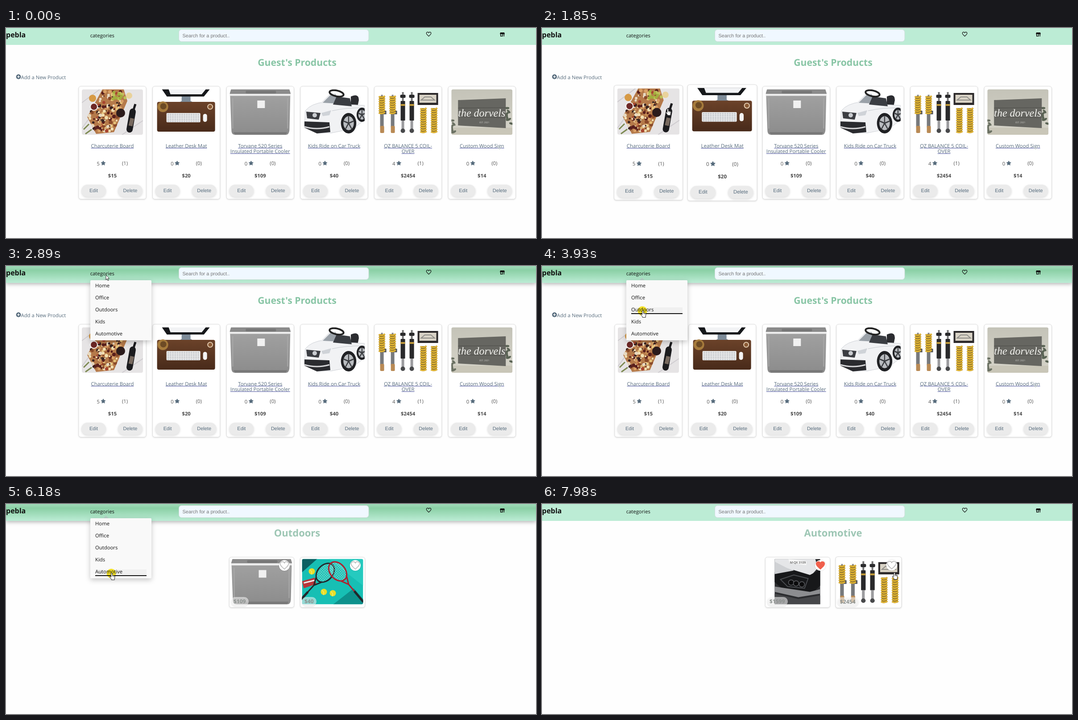
An HTML page for the animation above (8000 ms loop, 1188 by 472 pixels).

```html
<!DOCTYPE html>
<html lang="en">
<head>
<meta charset="utf-8">
<title>Shop</title>
<style>
html, body { margin: 0; width: 100%; height: 100%; overflow: hidden; background: #fefefe; }
svg { display: block; width: 1188px; height: 472px; }
text { font: 11.3px "Open Sans", "Noto Sans", sans-serif; text-rendering: geometricPrecision; }
.ui { font: 11px "Liberation Sans", Arial, sans-serif; }
.mid { text-anchor: middle; }
.slate { fill: #566b7c; }
.link { fill: #5d63a8; text-decoration: underline; text-decoration-skip-ink: none; }
.price { font-weight: 700; fill: #4a4a4a; }
.title { font-weight: 700; font-size: 22px; fill: #9dc6b4; }
.card { fill: #fff; stroke: #dedede; filter: drop-shadow(0 1px 1.5px rgba(0,0,0,.14)); }
.btn { fill: #ebebeb; filter: drop-shadow(0 2px 2px rgba(0,0,0,.14)); }
</style>
</head>
<body>
<svg id="stage" viewBox="0 0 1188 472" xmlns="http://www.w3.org/2000/svg"></svg>
<script>
const LOOP = 8000, GROW = 250;
const stage = document.getElementById('stage');
const range = n => [...Array(n).keys()];

let seed = 11;
const rnd = () => (seed = (seed * 16807) % 2147483647) / 2147483647;

const rect = (x, y, w, h, fill, r = 0, more = '') =>
  `<rect x="${x}" y="${y}" width="${w}" height="${h}" rx="${r}" fill="${fill}" ${more}/>`;
const dot = (x, y, r, fill, more = '') => `<circle cx="${x}" cy="${y}" r="${r}" fill="${fill}" ${more}/>`;
const shape = (d, fill, more = '') => `<path d="${d}" fill="${fill}" ${more}/>`;
const line = (d, stroke, w, more = '') =>
  `<path d="${d}" fill="none" stroke="${stroke}" stroke-width="${w}" ${more}/>`;
const text = (x, y, s, cls = '', more = '') => `<text x="${x}" y="${y}" class="${cls}" ${more}>${s}</text>`;
const heart = 'M12 21C5 15 2 12 2 8.2A5.2 5.2 0 0 1 12 6.5A5.2 5.2 0 0 1 22 8.2C22 12 19 15 12 21Z';
const star = 'M' + range(10).map(i => {
  const r = i % 2 ? 2.6 : 5.2, a = i * Math.PI / 5;
  return `${(r * Math.sin(a)).toFixed(2)} ${(-r * Math.cos(a)).toFixed(2)}`;
}).join('L') + 'Z';

// Pictures, each 137 by 102
function board() {
  const foods = ['#5a1f1c', '#e6c27a', '#8a4a2a', '#f2dfb0', '#c98f55', '#3a2320', '#d9a066', '#e8d9c0', '#a8442f'];
  let s = rect(0, 0, 137, 102, '#e6e4e5') + line('M0 30L40 0M90 102L137 70M0 88L20 60', '#cfccd0', 2)
    + shape('M46 0H94L102 26L72 96L32 100L12 62Z', '#b57a4a');
  for (let i = 0; i < 170; i++) {
    const v = rnd(), left = 47 - 32 * Math.min(v, .62) / .62 + (v > .62 ? (v - .62) * 35 : 0);
    const right = 98 - 26 * v;
    s += dot(left + (right - left) * rnd(), 4 + v * 90, 1.4 + rnd() * 2.8, foods[Math.floor(rnd() * foods.length)]);
  }
  for (let i = 0; i < 16; i++) s += dot(70 + rnd() * 28, 6 + rnd() * 18, 3.4, i % 2 ? '#a3ad3d' : '#bcc25a');
  return s + dot(24, 20, 8, '#d79a45') + dot(27, 39, 9, '#f5f3f0') + dot(27, 39, 7, '#6d2826')
    + dot(87, 53, 10, '#2b1b1c') + dot(106, 14, 7, '#e9d29b')
    + line('M4 90L16 78M8 100L22 90', '#7d8a52', 3)
    + line('M114 50L107 90', '#1b1b1e', 14, 'stroke-linecap="round"') + line('M120 33L114 52', '#1b1b1e', 5)
    + line('M113 65L109 82', '#77695f', 9);
}
function desk() {
  return rect(0, 0, 137, 102, '#fff') + shape('M14 0H121L108 16H25Z', '#16181b') + shape('M29 0H112L103 11H33Z', '#f2f3f5')
    + shape('M58 16H78V26L84 29H53L58 26Z', '#7d8b98')
    + rect(3, 28, 130, 67, 'url(#leather)', 4)
    + dot(16, 39, 12, '#a67b3c') + dot(17, 38, 7, '#6d4b25')
    + dot(122, 39, 6.5, '#e3cbb0') + dot(122, 39, 4.5, '#8a5a35')
    + rect(24, 53, 76, 21, '#f0f0f0', 2)
    + range(5).map(i => line(`M26 ${56 + i * 4}H98`, '#c3c6ca', 2.6, 'stroke-dasharray="4 1.2"')).join('')
    + rect(106, 55, 9, 18, '#f4f4f4', 4.5);
}
function cooler() {
  return rect(0, 0, 137, 102, '#fff') + shape('M1 14H136L134 92Q133 102 126 102H12Q4 102 4 92Z', 'url(#steel)')
    + shape('M3 0H134L137 10H0Z', '#8b8b8b') + rect(36, 3, 68, 6, '#777', 2) + rect(0, 10, 137, 4.5, '#ececec')
    + line('M7 20V88M130 20V88', '#a8a8a8', 2) + shape('M8 96H129L126 102H12Z', '#797979')
    + rect(62, 25, 17, 17, '#f1f1f1');
}
function car() {
  const wheel = (x, y, r) => `<g transform="translate(${x} ${y}) scale(.75 1)">${dot(0, 0, r, '#202124')}${dot(0, 0, r * .68, '#b9bcc0')}`
    + range(5).map(i => line(`M0 0V${-r * .66}`, '#3c3e42', 3, `transform="rotate(${i * 72})"`)).join('') + '</g>';
  return rect(0, 0, 137, 102, '#fff')
    + shape('M106 16Q124 8 124 24L120 44H106Z', '#2b2c30')
    + shape('M4 48Q16 32 48 28L100 34L137 36V68L112 88L62 98L30 98L2 84Z', '#f1f2f4', 'stroke="#cdd0d5"')
    + shape('M42 30L60 12L72 10L80 32Z', '#9aa1a8') + line('M40 31L60 11L72 10', '#e9eaec', 3)
    + shape('M66 34L74 16L104 20L108 38Z', '#3a3d42')
    + `<ellipse cx="74" cy="9" rx="16" ry="6.5" fill="none" stroke="#222" stroke-width="4" transform="rotate(12 74 9)"/>`
    + shape('M6 50L38 53L34 68L8 65Z', '#3b3d42') + shape('M40 53L62 47L58 58L43 60Z', '#cfd3d8')
    + shape('M2 72L58 74L60 96L30 99L2 86Z', '#2a2b2f') + line('M2 84Q30 92 58 84', '#d8d8da', 3)
    + line('M64 48Q100 40 136 42', '#c2c6cb', 1) + dot(25, 58, 5, '#c9ccd0')
    + wheel(101, 76, 23) + wheel(131, 57, 16);
}
function coil(x, y, n, w) {
  const ring = (i, color, width) =>
    line(`M${x - w} ${y + i * 5.2}Q${x} ${y + i * 5.2 + 4} ${x + w} ${y + i * 5.2 - 1}`, color, width);
  return rect(x - w + 1, y - 1, 2 * w - 2, (n - 1) * 5.2 + 3, '#8f7a3c')
    + range(n).map(i => ring(i, '#c4931a', 3.6) + ring(i, '#ecc441', 1.6)).join('');
}
function coilovers() {
  const strut = x => rect(x - 2, 12, 4, 60, '#8f8f8f') + rect(x - 4, 55, 8, 30, '#77797c') + rect(x + 4, 48, 6, 8, '#55575a')
    + coil(x, 16, 8, 7) + rect(x - 4, 82, 9, 16, '#b98a55', 2);
  const damper = x => rect(x - 2, 6, 4, 24, '#777') + rect(x - 6, 12, 12, 7, '#2a2a2c', 2) + rect(x - 5, 26, 10, 44, '#29292b', 1)
    + rect(x - 5, 33, 10, 4, '#c29b3a') + rect(x - 3, 70, 6, 20, '#9c9c9f') + dot(x, 93, 5, '#48494b');
  return rect(0, 0, 137, 102, '#fff') + strut(10) + strut(34) + damper(57) + damper(77)
    + rect(90, 8, 46, 27, '#2d2a2b') + rect(94, 12, 38, 18, '#d9d3c6') + line('M98 24L106 17H120L128 24Z', '#8f8d88', 2)
    + coil(103, 43, 11, 7) + coil(127, 43, 11, 7);
}
function sign() {
  const leaves = (x, y, c) => range(9).map(i =>
    `<ellipse cx="${x + (i % 3) * 5}" cy="${y + i * 4}" rx="5" ry="2.4" fill="${c}" transform="rotate(${i * 47} ${x} ${y + i * 4})"/>`).join('');
  return rect(0, 0, 137, 102, 'url(#wall)') + rect(0, 86, 137, 16, '#c9c6b8') + leaves(125, 42, '#5a6354')
    + shape('M15 24L122 20V87L15 81Z', '#666661') + line('M15 42L122 41M15 61L122 64', '#4f4f4b', 1.2)
    + leaves(2, 70, '#6c7264')
    + text(68, 61, 'the dorvels', 'mid', `fill="#f4f4f0" style="font:italic 24px 'Liberation Serif',serif"`)
    + text(74, 76, 'EST. 2021', 'mid', 'fill="#d8d8d4" style="font-size:5px"');
}
function tennis() {
  const racket = (x, y, a, c) => `<g transform="translate(${x} ${y}) rotate(${a})">`
    + `<ellipse rx="17" ry="24" fill="url(#net)" stroke="${c}" stroke-width="3"/>`
    + line('M-8 22L0 38L8 22M0 36V86', c, 3) + line('M0 58V90', '#20262a', 5) + '</g>';
  const ball = (x, y) => dot(x, y, 7, '#e9de26') + line(`M${x - 5} ${y - 4}Q${x + 2} ${y} ${x - 1} ${y + 7}`, '#f7f4b4', 1);
  return rect(0, 0, 137, 102, '#17bfb4') + shape('M60 0H137V60Z', '#25cabf') + shape('M0 0H34L0 30Z', '#0c5f62')
    + shape('M0 50L28 42L32 56L4 66Z', '#b8363a') + line('M4 54L28 48', '#eee', 3)
    + shape('M70 102L116 66L137 90V102Z', '#0d918c')
    + racket(52, 31, 42, '#23282c') + racket(80, 28, -40, '#b01f2d') + ball(22, 28) + ball(49, 74) + ball(69, 77);
}
function bumper() {
  return rect(0, 0, 137, 102, '#fff') + rect(17, 0, 102, 102, '#2b2c2f')
    + shape('M17 0H108L114 20L98 38L60 28L17 34Z', '#e5e6e8') + shape('M17 30L60 25L96 36L119 24V60L100 78L40 72L17 52Z', '#17181a')
    + shape('M17 6L44 20L60 26L17 34Z', '#cfd1d4') + shape('M48 0L88 5V14L50 9Z', '#f7f7f7')
    + text(69, 10, 'M·QX 3109', 'mid', 'fill="#222" style="font-size:7px"')
    + line('M30 46L60 36L92 44L84 66L46 62Z', '#4a4c50', 2)
    + [54, 65, 78].map((x, i) => dot(x, 53 + i * 2, 6, '#0b0b0c', 'stroke="#5c5e62" stroke-width="1.5"')).join('')
    + shape('M17 62L96 74L119 68V78L70 86L17 74Z', '#8c8d90') + shape('M17 78L70 90L119 82V102H17Z', '#46474a');
}
const photos = { board, desk, cooler, car, coilovers, sign, tennis, bumper };
const photo = (name, x, y) => `<g transform="translate(${x} ${y})" clip-path="url(#frame)"><use href="#${name}"/></g>`;

const gradient = (id, ...stops) => `<linearGradient id="${id}" x2="0" y2="1">`
  + stops.map(([o, c]) => `<stop offset="${o}" stop-color="${c}"/>`).join('') + '</linearGradient>';
const defs = `<defs>
  ${gradient('nav', [0, '#a0dab9'], [.25, '#8bd0a6'], [1, '#bcecd5'])}
  ${gradient('leather', [0, '#6b4229'], [1, '#482a1a'])}
  ${gradient('steel', [0, '#a0a0a0'], [1, '#8c8c8c'])}
  ${gradient('wall', [0, '#c4c3b8'], [1, '#d6d4c9'])}
  <pattern id="net" width="4" height="4" patternUnits="userSpaceOnUse">${line('M0 0H4M0 0V4', '#d8f0ea', .8)}</pattern>
  <clipPath id="frame">${rect(0, 0, 137, 102, '#000', 4)}</clipPath>
  ${Object.entries(photos).map(([id, draw]) => `<g id="${id}">${draw()}</g>`).join('')}
</defs>`;

const products = [
  ['board', ['Charcuterie Board'], 5, 1, 15],
  ['desk', ['Leather Desk Mat'], 0, 0, 20],
  ['cooler', ['Torvane 520 Series', 'Insulated Portable Cooler'], 0, 0, 109],
  ['car', ['Kids Ride on Car Truck'], 0, 0, 40],
  ['coilovers', ['QZ BALANCE 5 COIL-', 'OVER'], 4, 1, 2454],
  ['sign', ['Custom Wood Sign'], 0, 0, 14],
];
const cardX = i => 163 + i * 165.65;

const productCard = ([pic, name, stars, votes, price], i) => `<g class="product"><g transform="translate(${cardX(i)} 131)">`
  + rect(0, 0, 151, 253.5, '#fff', 5, 'class="card"') + photo(pic, 7, 7)
  + name.map((row, k) => text(75.5, 137.5 + k * 12.3, `<tspan class="slate">${row}</tspan>`, 'link mid')).join('')
  + text(40.5, 177.5, stars, '', 'fill="#555"') + shape(star, '#566b7c', 'transform="translate(55 173)" stroke="#566b7c" stroke-linejoin="round"')
  + text(97, 177, `(${votes})`, '', 'fill="#555"') + text(75.5, 204.5, '$' + price, 'price mid')
  + ['Edit', 'Delete'].map((s, k) => rect(6 + k * 82, 221, 55, 27.5, '#ebebeb', 13.7, 'class="btn"')
    + text(33.5 + k * 82, 237.5, s, 'ui mid slate')).join('') + '</g></g>';

const tile = (pic, price, x, liked) => `<g transform="translate(${x} 119.5)">`
  + rect(0, 0, 145, 113, '#fff', 5, 'class="card"') + photo(pic, 4, 4)
  + rect(3.5, 89.5, 12 + 7 * price.length, 20.5, 'rgba(255,255,255,.55)', 10, 'style="filter:drop-shadow(0 1px 1px rgba(0,0,0,.2))"')
  + text(9.5, 103.5, price, 'price', 'style="font-size:12px;fill:#8b908d"')
  + dot(123.5, 18.5, 12, '#fff', 'style="filter:drop-shadow(0 0 1px rgba(0,0,0,.2))"')
  + shape(heart, liked ? '#f0604d' : '#fff', `transform="translate(112.1 7) scale(.95)" stroke="${liked ? '#f0604d' : '#b5b5b5'}" stroke-width="1.5"`)
  + '</g>';

const page = (id, body) => `<g id="${id}">${body}</g>`;
const title = (id, s) => text(652.5, 73, s, 'title mid', `id="${id}"`);
const menuItems = ['Home', 'Office', 'Outdoors', 'Kids', 'Automotive'];

stage.innerHTML = defs + rect(0, 0, 1188, 472, '#fefefe')
  + page('shop', text(652.5, 85, "Guest's Products", 'title mid', 'style="font-size:21.2px;fill:#88c5a5"')
    + dot(28, 109.5, 5.4, '#566b7c') + line('M28 106.5V112.5M25 109.5H31', '#fff', 1.6)
    + text(33.5, 114.5, 'Add a New Product', 'slate') + products.map(productCard).join(''))
  + page('category', title('outTitle', 'Outdoors') + title('autoTitle', 'Automotive')
    + page('outTiles', tile('cooler', '$109', 500.5) + tile('tennis', '$40', 659.5))
    + page('autoTiles', tile('bumper', '$1599', 500.5, true) + page('lastTile', tile('coilovers', '$2454', 659.5)))
    + page('liked', dot(624, 138, 12, '#fff') + shape(heart, '#f0604d', 'transform="translate(612.6 126.5) scale(.95)"')))
  + rect(0, 0, 1188, 38, '#bcecd5')
  + rect(0, 0, 1188, 38, 'url(#nav)', 0, 'id="glow" style="filter:drop-shadow(0 3px 4px rgba(0,0,0,.28))"')
  + text(0, 21, 'pebla', '', 'fill="#111" style="font-size:16px;font-weight:700"')
  + text(188.7, 21, 'categories', '', 'fill="#111"')
  + rect(387.5, 3.5, 425.5, 27, '#f0f8ff', 6, 'stroke="#cfdcda"')
  + text(395.5, 20.5, 'Search for a product..', 'ui', 'fill="#757575"')
  + shape(heart, 'none', 'transform="translate(941.2 7.4) scale(.53)" stroke="#111" stroke-width="2.2"')
  + shape('M1108 10H1117L1118 14H1107Z', '#111') + line('M1108.7 14V18.3H1113V14M1116.3 14V19', '#111', 1.4)
  + page('menu', shape('M219 32L224 26L230 32Z', '#b3cfc4')
    + rect(189, 32, 137, 135, '#f9f9f9', 2, 'style="filter:drop-shadow(0 4px 6px rgba(0,0,0,.22))"')
    + page('hover', rect(200, 0, 115, 14, '#f0f0f0') + rect(200, 13, 115, 2, '#111'))
    + menuItems.map((s, i) => text(200, 48 + 27 * i, s, '', 'fill="#111"')).join(''))
  + dot(0, 0, 10.5, '#fbe92a', 'id="click" style="mix-blend-mode:multiply"')
  + page('arrow', shape('M0 0V11L2.5 8.7L4.3 13L6 12.3L4.2 8.2H7.5Z', '#fff', 'stroke="#222" stroke-width=".9"'))
  + page('hand', shape('M-1.4 .8Q0-.8 1.4.8V5L6 6.2Q7.4 6.8 7.2 8.5L6.2 13V15.5H-.8V14L-4.6 9Q-4.6 7.2-2.8 8L-1.4 9.2Z', '#fff', 'stroke="#222"')
    + line('M1.4 5V8M3.4 6V8.5M5.3 6.4V9', '#222', .7));

// Spans of movement: start, end, number of steps
const spans = [[280, 1070, 11], [1140, 1540, 6], [1690, 2490, 11], [2570, 2890, 5], [3140, 3770, 9], [3930, 4390, 7],
  [5150, 5720, 8], [6180, 6490, 5], [6640, 6640, 1], [7110, 7910, 11], [7980, 7980, 1]];
// Pointer stops: time, x, y, over something clickable
const stops = [[280, 1128, 412, 0], [400, 980, 392, 0], [500, 880, 330, 1], [740, 690, 215, 1], [900, 559, 119, 0],
  [920, 559, 119, 0], [1070, 474, 109, 0], [1140, 466, 135, 1], [1540, 390, 190, 1], [1690, 385, 190, 1],
  [1850, 282, 181, 1], [2250, 236, 120, 0], [2410, 228, 78, 0], [2490, 226, 47, 0], [2570, 222, 32, 0],
  [2890, 224, 20, 0], [3140, 224, 22, 0], [3290, 226, 46, 1], [3530, 229, 139, 1], [3770, 226, 100, 1],
  [5150, 226, 100, 1], [5720, 237, 155, 1], [7110, 237, 155, 1], [7180, 270, 205, 0], [7500, 470, 291, 0],
  [7750, 700, 240, 0], [7905, 790, 154, 1], [LOOP, 790, 154, 1]];
const hovers = [[1700, 2250], [1140, 1850], [700, 890], [490, 740], [400, 490], [LOOP, LOOP]];

const $ = id => document.getElementById(id);
const show = (id, on) => { $(id).style.display = on ? '' : 'none'; };
const place = (id, x, y) => $(id).setAttribute('transform', `translate(${x} ${y})`);
const cards = [...document.querySelectorAll('.product')];
const between = (t, a, b) => t >= a && t < b;

function snap(t) {
  const span = spans.filter(s => s[0] <= t).pop();
  if (!span) return 0;
  const [a, b, n] = span, step = (b - a) / (n - 1) || 1;
  return Math.min(b, a + Math.floor((t - a) / step + .1) * step);
}
const swell = (t, [a, b], d = GROW) => t < a ? 0
  : Math.max(0, Math.min(1, (Math.min(t, b) - a) / d) - Math.max(0, t - b) / d);
function grow(el, cx, cy, amount) {
  el.setAttribute('transform', `translate(${cx} ${cy}) scale(${1 + .03 * amount}) translate(${-cx} ${-cy})`);
}
function pointer(t) {
  const next = stops.findIndex(s => s[0] > t), i = Math.max(0, next - 1);
  const [a, x, y, hand] = stops[i], [b, x2, y2] = stops[i + 1];
  const k = Math.max(0, (t - a) / (b - a));
  return [x + (x2 - x) * k, y + (y2 - y) * k, hand];
}

function draw(time) {
  const t = snap(time), [x, y, hand] = pointer(t);
  const inShop = t < 4155, auto = t >= 6330, loaded = t >= 6640;
  show('shop', inShop);
  show('category', !inShop);
  show('outTitle', !auto);
  show('autoTitle', auto);
  show('outTiles', !loaded);
  show('autoTiles', loaded);
  show('liked', auto && !loaded);
  cards.forEach((card, i) => grow(card, cardX(i) + 75.5, 257.75, swell(t, hovers[i])));
  grow($('lastTile'), 732, 176, swell(t, [7830, LOOP]));

  $('glow').style.opacity = swell(t, [2500, 7110], 300);
  const open = between(t, 2570, 7180), row = Math.floor((y - 39) / 27);
  show('menu', open);
  show('hover', open && row >= 0 && row < 5 && y - 39 - row * 27 < 15);
  place('hover', 0, 39 + row * 27);

  show('click', between(t, 3930, 4150) || between(t, 6180, 6400));
  place('click', x - 1, y + 1);
  show('arrow', t >= 280 && !hand);
  show('hand', t >= 280 && hand);
  place('arrow', x, y);
  place('hand', x, y);
}

const start = performance.now();
function tick() {
  draw((performance.now() - start) % LOOP);
  requestAnimationFrame(tick);
}
tick();
</script>
</body>
</html>
```
